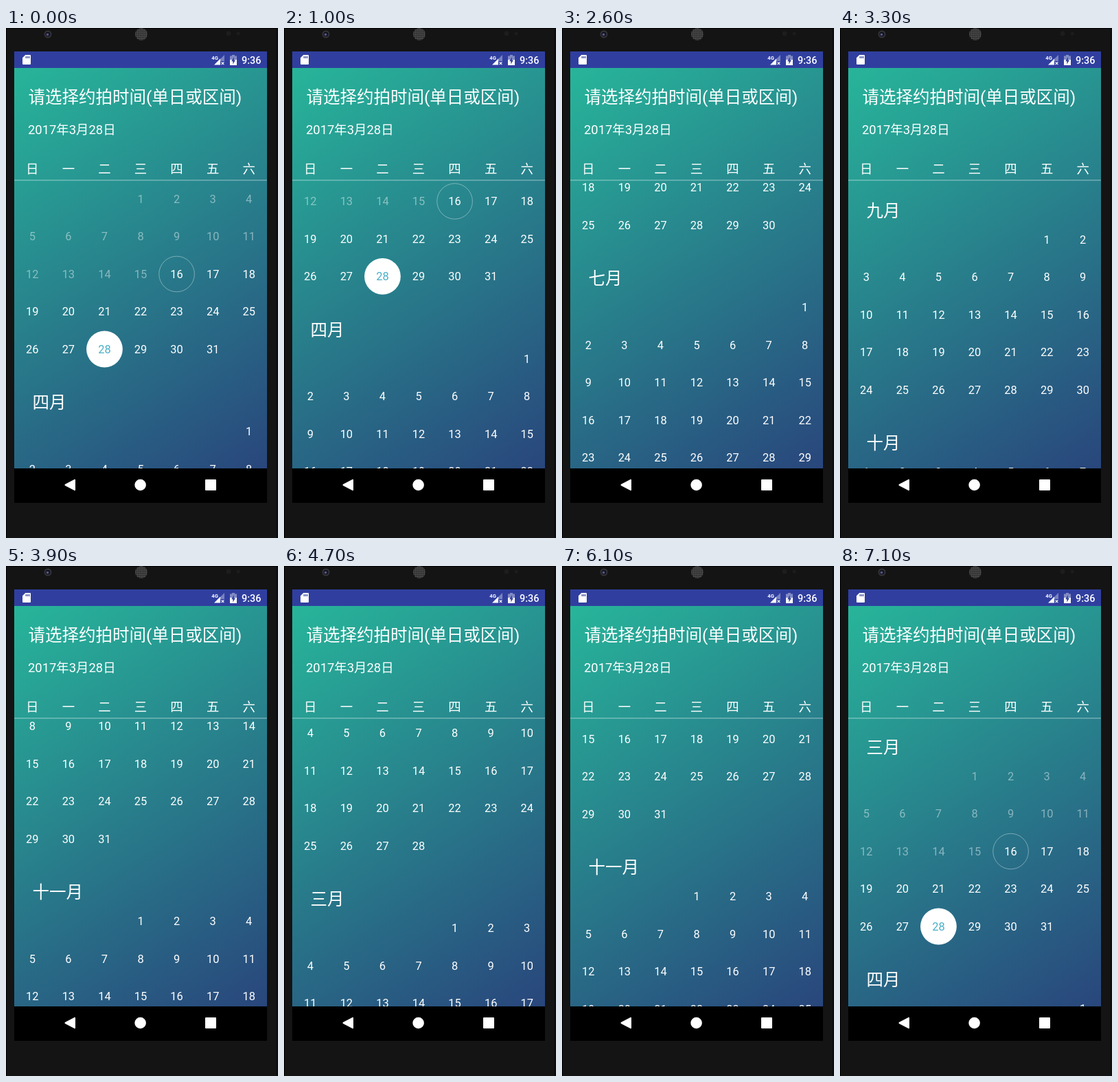
An HTML page that plays this animation: 396x740 px, repeating every 8000 ms.

```html
<!DOCTYPE html>
<html lang="zh-CN">
<head>
<meta charset="utf-8">
<title>Calendar</title>
<style>
html, body { margin: 0; width: 100%; height: 100%; overflow: hidden; background: #141414; }
svg { display: block; width: 396px; height: 740px; }
text { font-family: Roboto, "Noto Sans CJK SC", "Noto Sans CJK", sans-serif; fill: #fff; }
.day { font-size: 16.4px; text-anchor: middle; }
.month { font-size: 24.5px; }
.week { font-size: 18.4px; text-anchor: middle; }
.past { fill-opacity: .45; }
.picked { fill: #48b0c6; }
</style>
</head>
<body>
<svg viewBox="0 0 396 740" xmlns="http://www.w3.org/2000/svg">
  <defs>
    <linearGradient id="sky" gradientUnits="userSpaceOnUse" x1="12" y1="58" x2="380" y2="639">
      <stop offset="0" stop-color="#27b59a"/>
      <stop offset="1" stop-color="#29467c"/>
    </linearGradient>
    <pattern id="mesh" width="3" height="3" patternUnits="userSpaceOnUse">
      <rect width="3" height="3" fill="#4a4a4a"/>
      <circle cx="1.5" cy="1.5" r=".9" fill="#1c1c1c"/>
    </pattern>
    <clipPath id="view"><rect x="12" y="221" width="368" height="418"/></clipPath>
  </defs>

  <rect width="396" height="740" fill="#141414"/>
  <path d="M.5 0V740M0 .5H396" stroke="#000"/>
  <path d="M394.5 0V740" stroke="#050505"/>
  <circle cx="61" cy="9" r="5.5" fill="#34343a"/>
  <circle cx="61" cy="9" r="3.6" fill="#15151f"/>
  <circle cx="60.5" cy="9.5" r="1.8" fill="#55588c"/>
  <circle cx="197" cy="9" r="9" fill="url(#mesh)"/>
  <circle cx="324" cy="8" r="3.5" fill="#1d1d1d"/>
  <circle cx="338" cy="8" r="2.5" fill="#1d1d1d"/>

  <rect x="12" y="34" width="368" height="24" fill="#303f9f"/>
  <rect x="12" y="58" width="368" height="581" fill="url(#sky)"/>
  <rect x="12" y="639" width="368" height="50" fill="#000"/>

  <path d="M28.3 39H35Q36 39 36 40V52Q36 53 35 53H25Q24 53 24 52V43.3Z" fill="#fff"/>
  <path d="M29.3 41V44M31.5 41V44M33.7 41V44" stroke="#303f9f" stroke-width="1.2"/>
  <text x="299.3" y="45.6" font-size="7.6" font-weight="700">4G</text>
  <path d="M318 39V48H312V45Z" fill="#fff" fill-opacity=".35"/>
  <path d="M303 53.5L312 44.5V53.5Z" fill="#fff"/>
  <path d="M313.6 49.4L317.4 53.2M317.4 49.4L313.6 53.2" stroke="#fff" stroke-width="1.2"/>
  <path d="M326 40.5H329V39H333V40.5H336V46H326Z" fill="#fff" fill-opacity=".4"/>
  <path d="M326 46H336V54H326Z" fill="#fff"/>
  <path d="M331.8 42L328.2 48.2H330.4V52.4L334 46.4H331.8Z" fill="#303f9f"/>
  <text x="343" y="51.5" font-size="14.4" font-weight="500">9:36</text>

  <text x="32.4" y="109" font-size="24.5">请选择约拍时间(单日或区间)</text>
  <text x="32" y="153.7" font-size="18.4">2017年3月28日</text>
  <g id="week"></g>

  <g clip-path="url(#view)">
    <g id="list"></g>
    <circle id="glow" cx="196" r="552" fill="#3f51b5"/>
  </g>
  <path d="M12 220.8H380" stroke="#fff" stroke-opacity=".42" stroke-width="1.2"/>

  <g fill="#fff" stroke="#fff" stroke-linejoin="round" stroke-width="2">
    <path d="M86.5 663L100 655.8V670.2Z"/>
    <circle cx="195.6" cy="663" r="7.3"/>
    <rect x="291" y="656" width="14" height="14"/>
  </g>
</svg>
<script>
const LOOP = 8000, STEP = 100;
const COL = 368 / 7, ROW = 54.5, HEAD = 64.9, FIRST = 305, END = 4123;
const numerals = '一 二 三 四 五 六 七 八 九 十 十一 十二'.split(' ');
const $ = id => document.getElementById(id);
const list = $('list'), glow = $('glow');

function add(parent, tag, attrs, text = '') {
  const el = document.createElementNS('http://www.w3.org/2000/svg', tag);
  for (const key in attrs) el.setAttribute(key, attrs[key]);
  el.textContent = text;
  parent.append(el);
}

const colX = c => 12 + COL * (c + .5);

[...'日一二三四五六'].forEach((name, c) =>
  add($('week'), 'text', { x: colX(c), y: 211.3, class: 'week' }, name));

// y is the centre of the month's first row; returns that of the next month
function addMonth(index, y) {
  const start = new Date(2017, index, 1).getDay();
  const days = new Date(2017, index + 1, 0).getDate();
  add(list, 'text', { x: 38.5, y: y - 33.3, class: 'month' }, numerals[index % 12] + '月');
  for (let d = 1; d <= days; d++) {
    const cell = start + d - 1;
    const cx = colX(cell % 7), cy = y + ROW * Math.floor(cell / 7);
    let kind = 'day';
    if (index === 2) {
      if (d < 16) kind += ' past';
      if (d === 16) add(list, 'circle', { cx, cy, r: 25.8, fill: 'none', stroke: '#fff', 'stroke-opacity': .38 });
      if (d === 28) {
        kind += ' picked';
        add(list, 'circle', { cx, cy, r: 26.4, fill: '#fff' });
      }
    }
    add(list, 'text', { x: cx, y: cy + 5.9, class: kind }, d);
  }
  return y + HEAD + ROW * Math.ceil((start + days) / 7);
}

let rowY = FIRST;
for (let m = 2; m <= 14; m++) rowY = addMonth(m, rowY);

// time, scroll offset
const keys = [
  [0, 57], [800, 57], [1200, 330], [1500, 499.8], [1700, 545], [2000, 560],
  [2300, 560], [2400, 650], [2600, 1303.6], [2750, 1650], [2900, 1800],
  [3000, 1800], [3400, 2250], [3900, 2597.7], [4400, 3560], [4700, 3991.8], [5000, END],
  [5800, END], [6100, 2633.7], [6300, 1310], [6600, 0], [LOOP, 0]
];
const slope = i => (keys[i + 1][1] - keys[i][1]) / (keys[i + 1][0] - keys[i][0]);
const tangents = keys.map((_, i) => {
  if (i === 0 || i === keys.length - 1) return 0;
  const a = slope(i - 1), b = slope(i);
  return a * b > 0 ? 2 * a * b / (a + b) : 0;
});

// Monotone cubic through the keys
function scrollAt(t) {
  let i = 0;
  while (i < keys.length - 2 && t >= keys[i + 1][0]) i++;
  const [t0, p0] = keys[i], [t1, p1] = keys[i + 1];
  const h = t1 - t0, u = (t - t0) / h, v = 1 - u;
  return v * v * (1 + 2 * u) * p0 + u * u * (3 - 2 * u) * p1
    + h * u * v * (v * tangents[i] - u * tangents[i + 1]);
}

function drawGlow(t) {
  const atEnd = t < 5800;
  const u = atEnd ? (t - 5000) / 600 : (t - 6600) / 500;
  const on = u >= 0 && u < 1;
  const depth = on ? 60 * Math.sqrt(1 - u) : 0;
  glow.setAttribute('cy', atEnd ? 639 + 552 - depth : 221 - 552 + depth);
  glow.setAttribute('fill-opacity', on ? .45 * (1 - u) : 0);
}

function draw(time) {
  const t = Math.floor(time % LOOP / STEP) * STEP;
  list.setAttribute('transform', `translate(0 ${-scrollAt(t).toFixed(2)})`);
  drawGlow(t);
}

const begin = performance.now();
function tick() {
  draw(performance.now() - begin);
  requestAnimationFrame(tick);
}
tick();
</script>
</body>
</html>
```
